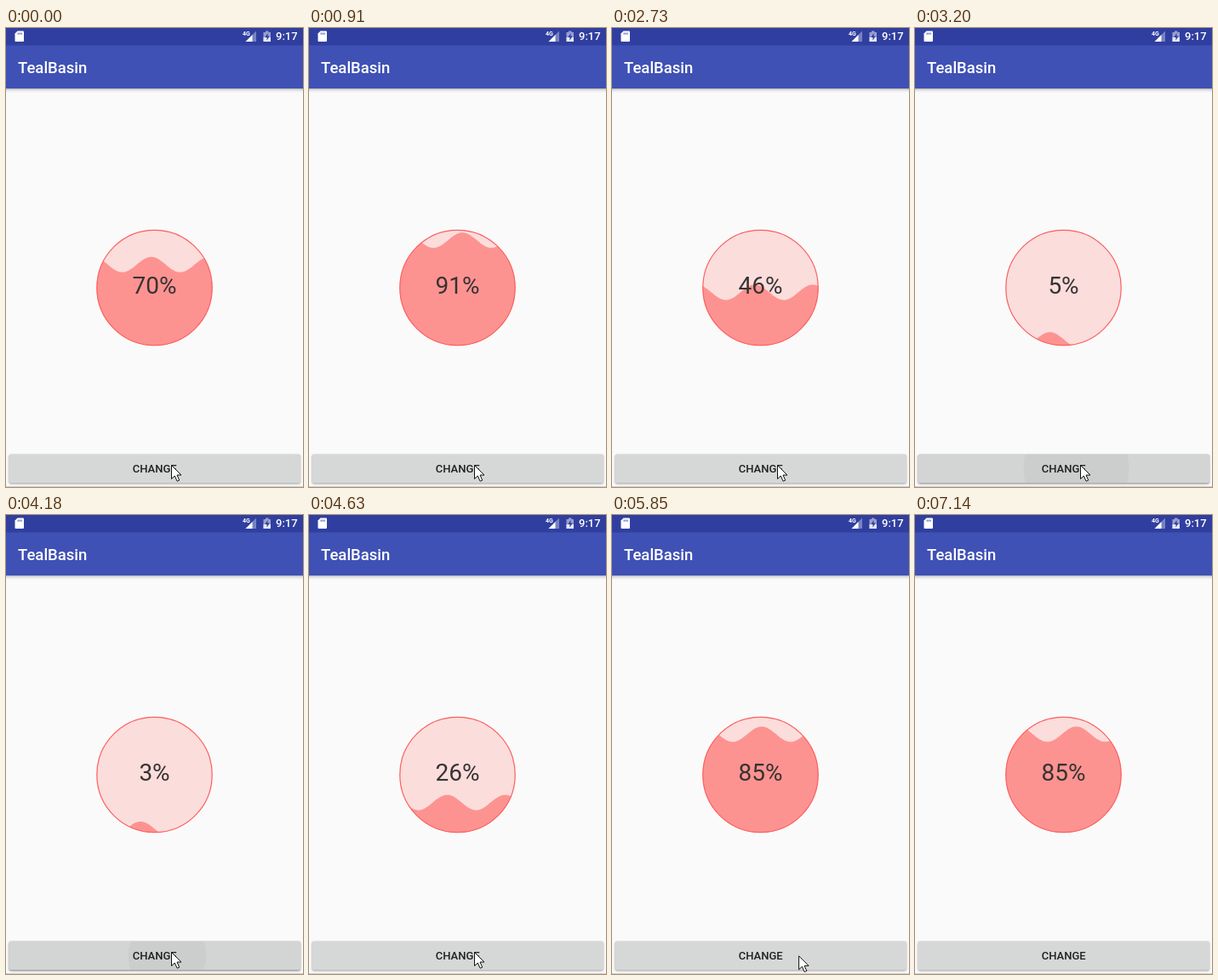
These frames come from a looping animation (349 px wide and 539 px high, 7.24 s). An HTML page:

```html
<!DOCTYPE html>
<html lang="en">
<head>
<meta charset="utf-8">
<title>TealBasin</title>
<style>
  html, body { margin: 0; width: 100%; height: 100%; overflow: hidden; background: #fafafa; }
  svg { display: block; width: 100vw; height: 100vh; font-family: Roboto, sans-serif; }
  .medium { font-weight: 500; }
</style>
</head>
<body>
<svg viewBox="0 0 349 539">
  <defs>
    <clipPath id="disc"><circle cx="174.5" cy="305" r="68"/></clipPath>
    <clipPath id="face"><rect x="3.5" y="500.5" width="342.5" height="33.5" rx="2"/></clipPath>
    <linearGradient id="fall" x2="0" y2="1">
      <stop offset="0" stop-color="#000" stop-opacity=".28"/>
      <stop offset=".4" stop-color="#000" stop-opacity=".09"/>
      <stop offset="1" stop-color="#000" stop-opacity="0"/>
    </linearGradient>
    <filter id="soft" x="-5%" y="-30%" width="110%" height="160%"><feGaussianBlur stdDeviation="1"/></filter>
  </defs>

  <rect width="349" height="539" fill="#fafafa"/>
  <rect y="71" width="349" height="5" fill="url(#fall)"/>
  <rect y="20" width="349" height="51" fill="#3f51b5"/>
  <rect width="349" height="20.5" fill="#303f9f"/>

  <!-- status icons -->
  <path d="M13.5 3.5H20a1 1 0 0 1 1 1V15a1 1 0 0 1-1 1H11.500a1 1 0 0 1-1-1V6.500Z" fill="#fff"/>
  <path d="M14.200 5.500v2.200M16.200 5.500v2.200M18.200 5.500v2.200" stroke="#303f9f" stroke-width=".9"/>
  <path d="M294 3.500V16H281.500Z" fill="#fff" opacity=".35"/>
  <path d="M289.500 8V16H281.500Z" fill="#fff"/>
  <text x="278" y="9.200" font-size="7" font-weight="700" fill="#fff">4G</text>
  <path d="M305 3.500h3.500V5H311v11h-8.500V5H305Z" fill="#fff" opacity=".5"/>
  <path d="M302.500 11H311v5h-8.500Z" fill="#fff" opacity=".75"/>
  <path d="M307.500 6l-3.200 5h2.200v3.500l3.200-5h-2.200Z" fill="#303f9f"/>
  <text class="medium" x="317" y="14.300" font-size="13" fill="#fff">9:17</text>
  <text class="medium" x="14" y="53.300" font-size="18.500" fill="#fff">TealBasin</text>

  <!-- gauge -->
  <circle cx="174.5" cy="305" r="68" fill="#fbdddc"/>
  <path id="water" fill="#fd9391" clip-path="url(#disc)"/>
  <circle cx="174.5" cy="305" r="67.700" fill="none" stroke="#fd605f" stroke-width="1.200"/>
  <text id="label" x="174.5" y="312" font-size="28" text-anchor="middle" fill="#373333"></text>

  <!-- button -->
  <rect id="shade" x="3.500" y="501.500" width="342.500" height="34" rx="2" filter="url(#soft)"/>
  <rect x="3.500" y="500.500" width="342.500" height="33.500" rx="2" fill="#d6d7d7"/>
  <g clip-path="url(#face)">
    <rect id="tint" x="3" y="500" width="344" height="35"/>
    <circle id="ripple" cx="189.500" cy="517"/>
  </g>
  <text class="medium" x="174.700" y="522" font-size="13" text-anchor="middle" fill="#222">CHANGE</text>
  <rect y="538" width="349" height="1" fill="#cfcfcf"/>

  <path id="cursor" d="M0 0V16L3.800 12.500L6.600 18.700L9.200 17.600L6.500 11.500H11.500Z"
        fill="#fff" stroke="#111" stroke-width="1" stroke-linejoin="round"/>
</svg>
<script>
const LOOP = 7240, MS_PER_PERCENT = 17.6;
const CX = 174.5, BOTTOM = 373, SIZE = 136;
const AMP = 9, WAVELENGTH = 68, FIRST_CREST = 157.5, DRIFT = 0.0106;

// each release of the button refills the gauge from empty
const fills = [
  { at: -1240, goal: 91 },
  { at: 1755, goal: 46 },
  { at: 3105, goal: 44 },
  { at: 4120, goal: 85 }
];

// screen refreshes: first time, last time, count
const runs = [
  [70, 790, 13], [850, 1540, 13], [1600, 2270, 13], [2330, 3010, 13], [3080, 3780, 13],
  [3830, 4520, 13], [4580, 5300, 14], [5350, 6020, 13], [6080, 6750, 13], [6810, 7140, 6]
];
const ticks = [0];
for (const [from, to, n] of runs)
  for (let i = 0; i < n; i++)
    ticks.push(Math.round((from + (to - from) * i / (n - 1)) / 10) * 10);

// button feedback, keyed by ms from the release
const rippleSize = [[-50, 0], [60, 46], [95, 62], [230, 190]];
const rippleAlpha = [[-50, .03], [120, .03], [390, 0]];
const tintAlpha = [[-230, 0], [-130, .014], [130, .014], [390, 0]];
const shadeAlpha = [[-230, .3], [-110, .42], [60, .42], [200, .3]];

const cursorX = [[5760, 194.5], [6020, 267], [6080, 275]];
const cursorY = [[5760, 513.5], [6020, 526], [6080, 541]];

const el = id => document.getElementById(id);
const [water, label, shade, tint, ripple, cursor] =
  ['water', 'label', 'shade', 'tint', 'ripple', 'cursor'].map(el);

function at(keys, t) {
  if (t <= keys[0][0]) return keys[0][1];
  for (let i = 1; i < keys.length; i++) {
    const [t0, v0] = keys[i - 1], [t1, v1] = keys[i];
    if (t <= t1) return v0 + (v1 - v0) * (t - t0) / (t1 - t0);
  }
  return keys[keys.length - 1][1];
}

function wavePath(level, age) {
  const mean = BOTTOM - SIZE * level / 100;
  const crest = FIRST_CREST + DRIFT * age;
  let d = `M${CX - 70} 375`;
  for (let x = CX - 70; x <= CX + 70; x += 2) {
    const y = mean - AMP * Math.cos((x - crest) / WAVELENGTH * 2 * Math.PI);
    d += `L${x} ${y.toFixed(2)}`;
  }
  return d + `L${CX + 70} 375Z`;
}

function draw(t) {
  const fill = fills.filter(f => f.at <= t).pop();
  const age = t - fill.at;
  const level = Math.min(fill.goal, Math.floor(age / MS_PER_PERCENT));
  water.setAttribute('d', wavePath(level, age));
  label.textContent = level + '%';

  const press = fills.find(f => t < f.at + 400) || fills[0];
  const since = t - press.at;
  ripple.setAttribute('r', at(rippleSize, since));
  ripple.setAttribute('opacity', at(rippleAlpha, since));
  tint.setAttribute('opacity', at(tintAlpha, since));
  shade.setAttribute('opacity', at(shadeAlpha, since));

  cursor.setAttribute('transform', `translate(${at(cursorX, t)} ${at(cursorY, t)})`);
}

const start = performance.now();
function frame() {
  const t = (performance.now() - start) % LOOP;
  draw(ticks.filter(k => k <= t).pop());
  requestAnimationFrame(frame);
}
frame();
</script>
</body>
</html>
```
